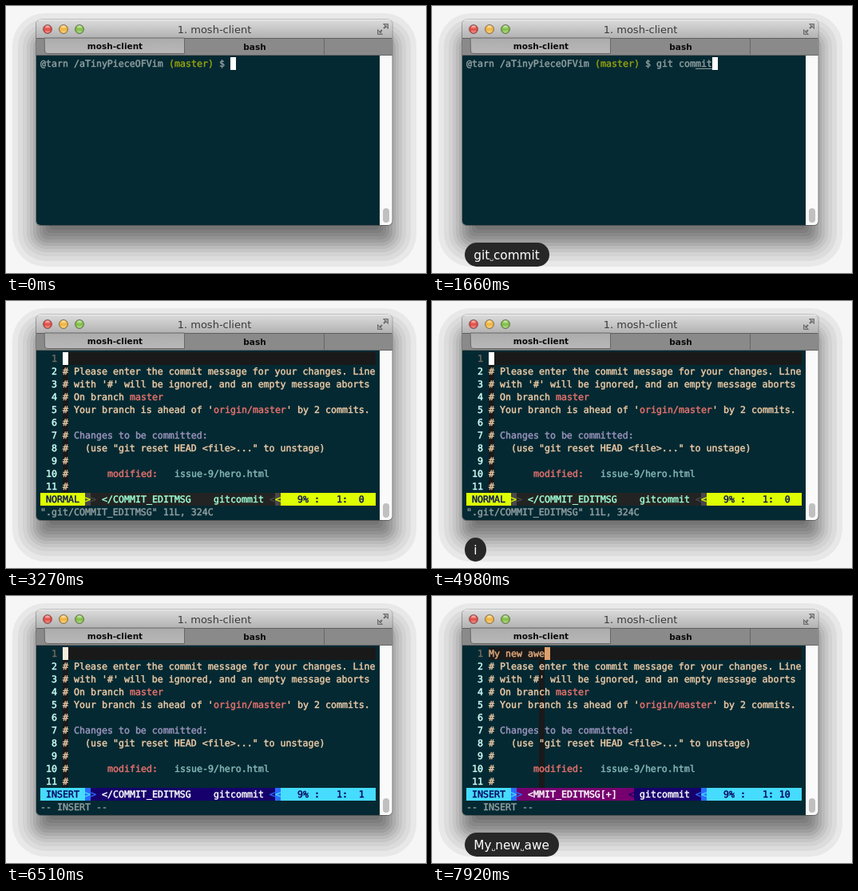
Recreate the animation shown at these times as an HTML page. Size 526 px wide and 334 px high, loop 8000 ms.

```html
<!DOCTYPE html>
<html lang="en">
<head>
<meta charset="utf-8">
<title>Terminal commit</title>
<style>
html, body { margin: 0; width: 100%; height: 100%; overflow: hidden; background: #f6f6f6; }
svg { display: block; width: 526px; height: 334px; }
text { white-space: pre; }
.ui { font-family: "DejaVu Sans", sans-serif; }
.term { font: 11.627px "DejaVu Sans Mono", monospace; text-rendering: geometricPrecision; }
.term text { stroke-width: .45px; }
</style>
</head>
<body>
<svg viewBox="0 0 526 334" xmlns="http://www.w3.org/2000/svg">
  <defs>
    <linearGradient id="bar" x2="0" y2="1"><stop stop-color="#dcdcdc"/><stop offset="1" stop-color="#b0b0b0"/></linearGradient>
    <linearGradient id="tab" x2="0" y2="1"><stop stop-color="#acacac"/><stop offset="1" stop-color="#b8b8b8"/></linearGradient>
    <linearGradient id="gloss" x2="0" y2="1"><stop stop-color="#fff" stop-opacity=".75"/><stop offset=".5" stop-color="#fff" stop-opacity="0"/><stop offset="1" stop-color="#fff" stop-opacity=".45"/></linearGradient>
    <clipPath id="win"><rect x="38" y="17" width="445.500" height="257" rx="5"/></clipPath>
  </defs>
  <rect width="526" height="334" fill="#f6f6f6"/>
  <g id="shadow"></g>
  <rect x="37.500" y="17" width="446.500" height="257.500" rx="5.500" fill="none" stroke="#000" stroke-opacity=".3"/>
  <g clip-path="url(#win)">
    <rect x="38" y="17" width="446" height="24" fill="url(#bar)"/>
    <rect x="38" y="17" width="446" height="1" fill="#eee"/>
    <rect x="38" y="40" width="446" height="22" fill="#8a8a8a"/>
    <rect x="38" y="40" width="446" height="1" fill="#5e5e5e"/>
    <path d="M48 40H223.500V59.500H52Q48.500 59.500 48.500 56Z" fill="url(#tab)" stroke="#666"/>
    <path d="M398.500 41V61M38 61.500H484" stroke="#666"/>
    <rect x="38" y="62" width="430" height="212" fill="#042932"/>
    <rect x="468" y="62" width="16" height="212" fill="#fafafa"/>
    <rect x="472" y="253" width="8" height="18" rx="4" fill="#c0c0c0"/>
  </g>
  <g id="lights"></g>
  <g fill="#a2a2a2" stroke="#6c6c6c">
    <path d="M472.500 22.500H478.500V28.500ZM465.500 29.500V35.500H471.500Z"/>
    <path d="M476 25L473 28M468 33L471 30" stroke-width="2"/>
  </g>
  <g class="ui" text-anchor="middle">
    <text x="261" y="34" font-size="13" fill="#3a3a3a">1. mosh-client</text>
    <g font-size="10.500" font-weight="bold" fill="#0a0a0a">
      <text x="136.500" y="54">mosh-client</text>
      <text x="311.500" y="55">bash</text>
    </g>
  </g>
  <g id="term" class="term"></g>
  <g id="bubble" class="ui">
    <rect x="41" y="296" height="30" rx="15" fill="#272727"/>
    <text x="52.200" y="317" font-size="15.300" fill="#fff"></text>
  </g>
</svg>
<script>
const LOOP = 8000, COLS = 60, CW = 7, CH = 16, X0 = 43, Y0 = 64;
const $ = s => document.querySelector(s);
const GRAY = '#8f9ea0', SAND = '#eccaa6', RED = '#e5716d', DARK = '#191919', NAVY = '#16006c';
const COMMAND = 'git commit', MESSAGE = 'My new awe';

// start time, keys shown in the bubble, characters typed on the line
const shellSteps = [[0, 0, 0], [500, 1, 0], [590, 1, 1], [680, 2, 1], [770, 3, 2], [860, 4, 3],
  [950, 4, 4], [1040, 5, 4], [1130, 6, 5], [1220, 7, 6], [1310, 8, 7], [1400, 9, 8],
  [1490, 10, 9], [1660, 10, 10], [1840, 11, 10]];
const editSteps = [[0, 0, 0], [6780, 1, 0], [6960, 2, 1], [7040, 2, 2], [7220, 4, 3], [7310, 4, 4],
  [7400, 5, 5], [7490, 6, 6], [7580, 7, 6], [7660, 8, 7], [7750, 8, 8], [7840, 9, 9], [7920, 10, 10]];

const themes = {
  NORMAL: { main: '#dfff00', ink: '#0c1560', mid: '#484848', side: '#232323', text: '#9cffd3' },
  INSERT: { main: '#45dcff', ink: '#04085f', mid: '#2a6cff', side: NAVY, text: '#ffffff' }
};

const stepAt = (steps, t) => steps.filter(s => s[0] <= t).pop();
const esc = s => s.replace(/&/g, '&amp;').replace(/</g, '&lt;').replace(/>/g, '&gt;');

let out = '';
function fill(col, row, w, color, h = 1) {
  out += `<rect x="${X0 + col * CW}" y="${Y0 + row * CH}" width="${w * CW}" height="${h * CH}" fill="${color}"/>`;
}
function put(col, row, str, fg, bg) {
  if (bg) fill(col, row, str.length, bg);
  out += `<text x="${X0 + col * CW}" y="${Y0 + row * CH + 12}" fill="${fg}" stroke="${fg}">${esc(str)}</text>`;
}
// consecutive [text, colour] runs
function runs(col, row, list) {
  for (const [str, fg] of list) {
    put(col, row, str, fg);
    col += str.length;
  }
}

function shell(t) {
  if (t >= 2020) {
    fill(0, 0, 1, '#fff');
    return;
  }
  const n = stepAt(shellSteps, t)[2];
  runs(0, 0, [['@tarn /aTinyPieceOFVim ', GRAY], ['(master)', '#94a010'], [' $ ' + COMMAND.slice(0, n), GRAY]]);
  const pending = t < 1750 ? Math.min(n, 3) : t < 1840 ? 1 : 0;
  if (pending) {
    out += `<rect x="${X0 + (34 + n - pending) * CW}" y="78" width="${pending * CW}" height="1" fill="${GRAY}"/>`;
  }
  if (t < 1930) fill(34 + n, 0, 1, '#fff');
  else fill(0, 1, 1, '#fff');
}

const page = [
  [],
  [['# Please enter the commit message for your changes. Line', SAND]],
  [["# with '#' will be ignored, and an empty message aborts", SAND]],
  [['# On branch ', SAND], ['master', RED]],
  [["# Your branch is ahead of '", SAND], ['origin/master', RED], ["' by 2 commits.", SAND]],
  [['#', SAND]],
  [['# ', SAND], ['Changes to be committed:', '#9a94bd']],
  [['#   (use "git reset HEAD <file>..." to unstage)', SAND]],
  [['#', SAND]],
  [['#       ', SAND], ['modified:', RED], ['   issue-9/hero.html', '#86b8b8']],
  [['#', SAND]]
];

function statusLine(mode, changed, column) {
  const c = themes[mode], r = 11, side = changed ? '#76006e' : c.side;
  fill(9, r, 33, c.side);
  if (changed) fill(9, r, 21, side);
  put(0, r, ` ${mode} `, c.ink, c.main);
  put(8, r, '>', c.main, c.mid);
  put(9, r, '>', c.mid);
  put(11, r, changed ? '<MMIT_EDITMSG[+]' : '</COMMIT_EDITMSG', c.text);
  if (changed) put(29, r, '<', c.side);
  put(31, r, 'gitcommit', c.text);
  put(41, r, '<', c.mid);
  put(42, r, '<', c.main, c.mid);
  put(43, r, `   9% :   1:${String(column).padStart(3)}  `, c.ink, c.main);
}

function editor(t) {
  const n = stepAt(editSteps, t)[2], synced = Math.max(0, n - 1);
  const insert = t >= 5340;
  fill(4, 0, COLS - 4, DARK);
  fill(4 + synced, 0, 1, DARK, 11);
  page.forEach((line, i) => {
    put(0, i, String(i + 1).padStart(3), i ? '#ccfff8' : '#75695e');
    runs(4, i, line);
  });
  if (n) put(4, 0, MESSAGE.slice(0, n), '#e0aa7c');
  fill(4 + n, 0, 1, n ? '#dda06c' : insert ? '#f7ecdc' : '#fff');
  statusLine(insert ? 'INSERT' : 'NORMAL', synced > 0, insert ? synced + 1 : 0);
  put(0, 12, t >= 5250 ? '-- INSERT --' : '".git/COMMIT_EDITMSG" 11L, 324C', GRAY);
}

// returns the keys pressed and the bubble's opacity
function keysAt(t) {
  const fade = start => t < start ? 1 : t < start + 90 ? .66 : t < start + 180 ? .33 : 0;
  if (t < 3270) return [(COMMAND + '\n').slice(0, stepAt(shellSteps, t)[1]), fade(3090)];
  if (t < 4980) return ['', 0];
  if (t < 6510) return ['i', fade(6330)];
  return [MESSAGE.slice(0, stepAt(editSteps, t)[1]), 1];
}

const bubble = $('#bubble'), pill = $('#bubble rect'), label = $('#bubble text');
function drawBubble(keys, alpha) {
  bubble.setAttribute('opacity', keys ? alpha : 0);
  label.innerHTML = keys
    .replace(/ /g, '<tspan font-size="7.5">\u2423</tspan>')
    .replace('\n', '<tspan font-size="18">\u21a9</tspan>');
  pill.setAttribute('width', keys ? Math.round(label.getComputedTextLength() + 23) : 0);
}

function chrome() {
  const spreads = [30, 23, 17, 12, 8, 4, 0, -4, -8, -12, -16];
  const grays = [232, 220, 210, 198, 186, 172, 158, 146, 136, 126, 116];
  $('#shadow').innerHTML = spreads.map((s, i) =>
    `<rect x="${38 - s}" y="${39 - s}" width="${446 + 2 * s}" height="${257 + 2 * s}" rx="${Math.max(6, 14 + s * .9)}" fill="rgb(${grays[i]},${grays[i]},${grays[i]})"/>`).join('');
  $('#lights').innerHTML = ['#e2463f', '#f0b135', '#7cbc3e'].map((c, i) =>
    `<circle cx="${52 + i * 20}" cy="29" r="5.500" fill="${c}" stroke="#555" stroke-opacity=".7"/>` +
    `<ellipse cx="${52 + i * 20}" cy="29" rx="3.500" ry="4.500" fill="url(#gloss)"/>`).join('');
}

let last = '';
function draw(t) {
  out = '';
  (t < 2110 ? shell : editor)(t);
  const [keys, alpha] = keysAt(t), state = out + keys + alpha;
  if (state === last) return;
  last = state;
  $('#term').innerHTML = out;
  drawBubble(keys, alpha);
}

chrome();
draw(0);
const start = performance.now();
function tick() {
  draw((performance.now() - start) % LOOP);
  requestAnimationFrame(tick);
}
requestAnimationFrame(tick);
</script>
</body>
</html>
```
